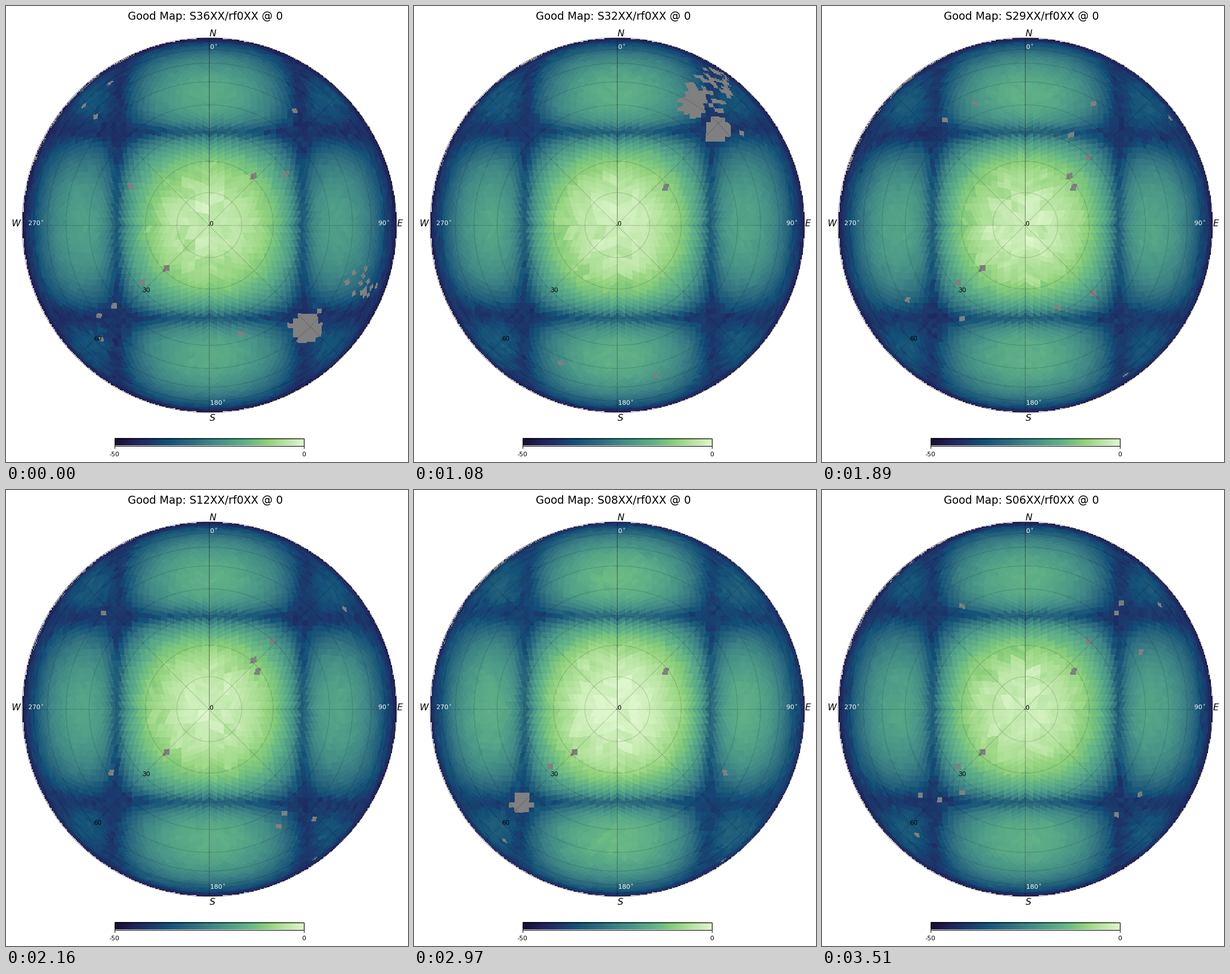
A matplotlib script that plays this animation: 703 by 797 pixels, repeating every 3.78 s.

```python
import numpy as np
import matplotlib.pyplot as plt
from matplotlib.animation import FuncAnimation
from matplotlib.colors import LinearSegmentedColormap, to_rgba
from matplotlib.patches import Circle, Rectangle

W, H, DPI = 703, 797, 100
CX, CY, R = 355.5, 383, 327
SIZE = 400
TILES = [*range(36, 28, -1), 12, *range(10, 5, -1)]
GAIN = {36: -3, 8: -.2}  # main lobe level in dB where it is not the usual -2

# Larger areas without data: centre, radius, filled share
HOLES = {
    36: [(525, 562, 27, 1), (618, 480, 32, .25)],
    34: [(531, 222, 21, 1), (521, 558, 18, 1), (306, 412, 9, 1), (348, 408, 9, 1)],
    32: [(530, 216, 22, 1), (488, 172, 24, 1), (515, 148, 40, .4)],
    30: [(186, 546, 21, 1)],
    8: [(188, 546, 18, 1)],
}
# Cells that are empty for most tiles
WEAK_CELLS = [(431, 298), (438, 318), (465, 264), (237, 483), (279, 459)]

plt.rcParams["font.family"] = "DejaVu Sans"
jade = LinearSegmentedColormap.from_list("jade", [
    (0, "#150f2e"), (.1, "#22205a"), (.2, "#1c386c"), (.28, "#135078"),
    (.4, "#2b6a7e"), (.5, "#3d8385"), (.6, "#4d9b88"), (.7, "#63b387"),
    (.78, "#80c97c"), (.82, "#93d37f"), (.9, "#b7e4a1"), (1, "#def6cc")])


def healpix(nside, x, y):
    """Ring index of the equal-area sky cell seen from above at (x, y)."""
    z = np.sqrt(np.clip(1 - x**2 - y**2, 0, 1))
    turn = (np.arctan2(y, x) / (np.pi / 2)) % 4
    part = turn % 1
    reach = nside * np.sqrt(3 * (1 - z))
    ring = np.floor(part * reach) + np.floor((1 - part) * reach) + 1
    cap = 2 * ring * (ring - 1) + np.floor(turn * ring)
    up = np.floor(nside * (.5 + turn - .75 * z))
    down = np.floor(nside * (.5 + turn + .75 * z))
    ring = nside + 1 + up - down
    shift = 1 - ring % 2
    column = ((up + down - nside + shift + 1) // 2) % (4 * nside)
    belt = 2 * nside * (nside - 1) + (ring - 1) * 4 * nside + column
    return np.where(z > 2 / 3, cap, belt).astype(int)


axis = (np.arange(SIZE) + .5) / SIZE * 2 - 1
gx, gy = np.meshgrid(axis, axis)
inside = gx**2 + gy**2 < 1
sky = np.where(inside, healpix(32, gx, gy), 0)

# Centre of every cell, in units of the disc radius
count = np.maximum(np.bincount(sky[inside]), 1)
px = np.bincount(sky[inside], gx[inside]) / count
py = np.bincount(sky[inside], gy[inside]) / count
radius = np.hypot(px, py)
height = np.sqrt(np.clip(1 - radius**2, 0, 1))
patch = healpix(16, px, py)


def bent(a, b, rng):
    """Shift a along b so that the dark bands curve a little at their ends."""
    ends = rng.uniform(-.025, .025, (2, 2))
    pull = ends[(a > 0).astype(int), (b > 0).astype(int)]
    return a + pull * (b / .7)**2 * np.minimum(np.abs(a) / .5, 1)


def array_power(u):
    half = np.pi * .502 * u + 1e-9
    return (np.sin(4 * half) / (4 * np.sin(half)))**2 + .0011


def beam(tile, rng):
    u, v = bent(px, py, rng), bent(py, px, rng)
    element = (np.sin(.86 * height) / np.sin(.86))**2 * (1 - px**2)**.8
    db = 10 * np.log10(array_power(u) * array_power(v) * element + 10**-3.85)
    db -= 8 * np.exp(-(height / .13)**2)
    noise = rng.normal(0, 1, px.size) * np.where(db < -32, .8, .35)
    blotch = rng.normal(0, 1, patch.max() + 1)[patch]
    noise += blotch * np.where(radius < .33, np.where(px < .1, .9, .4), .2)
    return db + GAIN.get(tile, -2) + noise


def missing(rng, tile):
    bad = np.zeros(px.size, bool)

    def drop(x, y):
        bad[np.argmin((px - x)**2 + (py - y)**2)] = True

    for x, y in WEAK_CELLS:
        if rng.random() < .6:
            drop((x - CX) / R, (y - CY) / R)
    # Stray gaps gather where the dark bands cross
    for _ in range(rng.integers(3, 16)):
        x, y = rng.choice([-.52, .52], 2) + rng.normal(0, .14, 2)
        drop(x, y)
    for x, y, size, share in HOLES.get(tile, []):
        distance = np.hypot(CX + R * px - x, CY + R * py - y)
        ragged = size * rng.uniform(.85, 1.1, px.size)
        bad |= (distance < ragged) & (rng.random(px.size) < share)
    horizon = (radius > .992) & (px < -.4) & (py < -.3)
    return bad | horizon & (rng.random(px.size) < .35)


def render(tile):
    rng = np.random.default_rng(tile)
    colors = jade(np.clip(beam(tile, rng) / 50 + 1, 0, 1))
    colors[missing(rng, tile)] = to_rgba("#808080")
    picture = colors[sky]
    picture[~inside] = (1, 1, 1, 0)
    return picture


maps = [render(tile) for tile in TILES]

fig = plt.figure(figsize=(W / DPI, H / DPI), dpi=DPI, facecolor="white")
ax = fig.add_axes([0, 0, 1, 1])
ax.axis("off")


def label(x, y, text, size=11.1, **style):
    return ax.text(x, y, text, fontsize=size * 72 / DPI, va="baseline", **style)


ax.add_patch(Circle((CX, CY), R + .6, fill=False, ec="#999999", lw=.8))
image = ax.imshow(maps[0], extent=(CX - R, CX + R, CY + R, CY - R),
                  interpolation="nearest", zorder=1.5)

grid = dict(color="black", lw=.8, alpha=.42, zorder=2)
mid = CX - 1
t = np.linspace(0, 2 * np.pi, 361)
for angle in range(10, 90, 10):
    r = R * np.sin(np.radians(angle))
    ax.plot(CX + r * np.sin(t), CY - r * np.cos(t), ls=":", **grid)
for azimuth in np.radians(np.arange(0, 360, 45)):
    ax.plot([mid, mid + R * np.sin(azimuth)], [CY, CY - R * np.cos(azimuth)],
            ls="-" if azimuth == 0 else ":", **grid)
ax.plot([mid, mid], [CY, CY + R], ls=":", **grid)

for x, y, text in [(361.5, 53, "N"), (688.5, 384.5, "E"), (361, 725, "S"), (17.5, 384.5, "W")]:
    label(x, y, text, 16, ha="center", style="italic")
for x, y, text in [(355.5, 76, "0"), (650, 383.5, "90"), (355.5, 697.5, "180"), (38.5, 383.5, "270")]:
    label(x, y, text + r"$^\circ$", color="white")
for x, y, text in [(355, 384, "0"), (238.5, 500, "30"), (153.5, 585, "60")]:
    label(x, y, text)

ax.imshow(np.linspace(0, 1, 256)[None], cmap=jade, extent=(189.5, 520.5, 768.5, 755.5),
          aspect="auto", interpolation="nearest")
ax.add_patch(Rectangle((189.5, 755.5), 331, 13, fill=False, ec="black", lw=.8, zorder=3))
for x, text in [(189.5, "-50"), (520.5, "0")]:
    ax.plot([x, x], [768.5, 773], color="black", lw=.7)
    label(x, 787, text, ha="center")

title = label(348.5, 23.5, "", 18.9, ha="center")
ax.set_xlim(0, W)
ax.set_ylim(H, 0)
ax.set_aspect("auto")


def update(i):
    image.set_data(maps[i])
    title.set_text(f"Good Map: S{TILES[i]:02d}XX/rf0XX @ 0")
    return image, title


anim = FuncAnimation(fig, update, frames=len(TILES), interval=270, repeat=True, repeat_delay=0)
plt.show()
```
